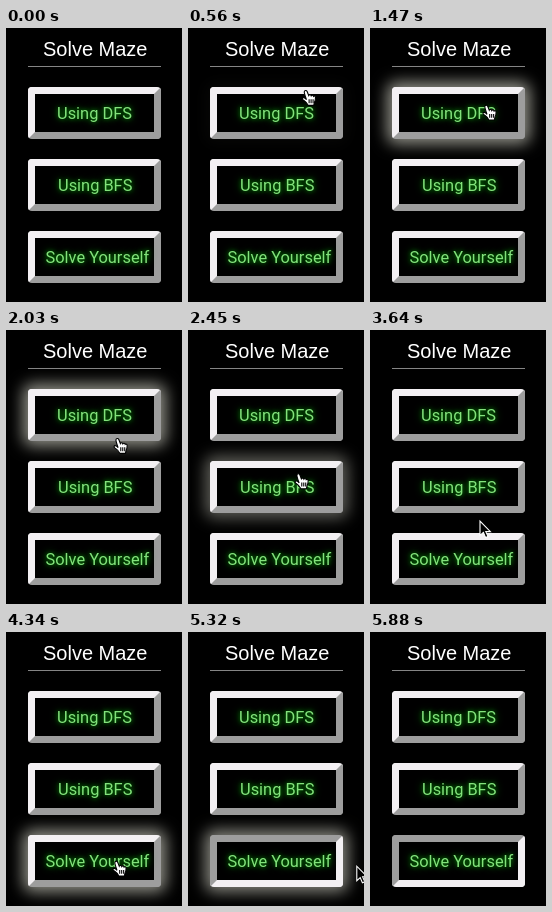
These frames come from a looping animation (176x274 px, 5950 ms). An HTML page:

```html
<!DOCTYPE html>
<html lang="en">
<head>
<meta charset="utf-8">
<title>Solve Maze</title>
<style>
  html, body { margin: 0; width: 100%; height: 100%; overflow: hidden; background: #000; }
  #stage { position: relative; width: 176px; height: 274px; overflow: hidden; background: #000; }
  h1 {
    position: absolute; left: 37px; top: 9px; margin: 0; white-space: nowrap;
    font: 20px/24px "Liberation Sans", Arial, sans-serif; color: #fff;
  }
  .rule { position: absolute; left: 22px; top: 38px; width: 133px; height: 1px; background: #858585; }
  .btn {
    --lit: #f3f0f3; --dim: #9d9d9d;
    position: absolute; left: 22px; width: 133px; height: 52px; box-sizing: border-box;
    border: 7px solid; border-color: var(--lit) var(--dim) var(--dim) var(--lit);
    border-radius: 4px; background: #000;
  }
  .btn.pressed { border-color: var(--dim) var(--lit) var(--lit) var(--dim); }
  .btn span {
    position: absolute; top: 10px; white-space: nowrap;
    font: 16.4px/20px Roboto, Inter, sans-serif; color: #82e27b;
    text-shadow: 0 0 4px #0a8a0a, 0 0 8px #0a7a0a;
  }
  svg { position: absolute; left: 0; top: 0; }
</style>
</head>
<body>
<div id="stage">
  <h1>Solve Maze</h1>
  <div class="rule"></div>
  <div class="btn"><span style="left:22px">Using DFS</span></div>
  <div class="btn"><span style="left:23px">Using BFS</span></div>
  <div class="btn"><span style="left:10.5px">Solve Yourself</span></div>
  <svg width="176" height="274">
    <g id="cursor">
      <path id="arrow" d="M0 0V14.5L3.4 11.4 5.6 16.6 8 15.6 5.8 10.6H10.4Z"
        fill="#000" stroke="#fff" stroke-width="1.1"/>
      <g id="hand" transform="translate(-4 -2) scale(1.1)" stroke="#000">
        <path fill="#fff" d="M4.6 9.4C3.8 7.2 2.4 3.6 2.6 2.2 2.8.8 4.6.6 5.2 2L6.6 5.6C7 4.6 8.6 4.8 8.9 5.9 9.4 5 10.8 5.2 11 6.4 11.6 5.8 12.8 6.2 12.8 7.4 12.8 9.4 12.6 10.4 11.8 12L11.2 14.6H6.2C5.4 13 3.2 10.6 1.6 9.6.4 8.8.8 7.4 2.2 7.6 3.2 7.8 4 8.6 4.6 9.4Z"/>
        <path fill="none" d="M7 9V12.6M8.8 9V12.6M10.6 9V12.6"/>
      </g>
    </g>
  </svg>
</div>
<script>
const LOOP = 5950, STEP = 70, PRESS = 4550, FADE = 300;
const LEFT = 22, TOP = 59, WIDTH = 133, HEIGHT = 52, PITCH = 72;

// the pointer's moves: start time, end time, where it comes to rest
const origin = [156, 20];
const moves = [
  [70, 800, 116, 78],
  [1470, 2760, 110, 156],
  [3100, 3450, 110, 191],
  [3640, 4060, 110, 230],
  [5200, 5500, 185, 242]
];

const $ = id => document.getElementById(id);
const cursor = $("cursor"), arrow = $("arrow"), hand = $("hand");
const buttons = [...document.querySelectorAll(".btn")];
buttons.forEach((btn, i) => btn.style.top = TOP + i * PITCH + "px");

const smooth = p => p * p * (3 - 2 * p);
const easeOut = p => 1 - (1 - p) ** 3;

function pointAt(t) {
  let [x, y] = origin;
  for (const [from, to, toX, toY] of moves) {
    const p = Math.min(1, Math.max(0, (t - from) / (to - from)));
    x += (toX - x) * easeOut(p);
    y += (toY - y) * smooth(p);
  }
  return [x, y];
}

// index of the button under the pointer, or -1
function hovered(t) {
  const [x, y] = pointAt(t);
  const row = Math.floor((y - TOP) / PITCH);
  const inside = x >= LEFT && x < LEFT + WIDTH && y - TOP - row * PITCH < HEIGHT;
  return inside ? row : -1;
}

// the glow follows how much of the last FADE ms was spent on the button
function glowAt(t, i) {
  const samples = 30;
  let hits = 0;
  for (let k = 0; k < samples; k++) hits += hovered(t - k * FADE / samples) === i;
  return smooth(hits / samples);
}

function draw(time) {
  const t = Math.floor((time % LOOP) / STEP) * STEP;
  const [x, y] = pointAt(t);
  const over = hovered(t) >= 0;

  cursor.style.display = t < moves[0][0] ? "none" : "";
  cursor.setAttribute("transform", `translate(${x} ${y})`);
  hand.style.display = over ? "" : "none";
  arrow.style.display = over ? "none" : "";

  buttons.forEach((btn, i) => {
    btn.style.boxShadow = `0 0 15px 5px rgba(145,145,136,${glowAt(t, i)})`;
  });
  buttons[2].classList.toggle("pressed", t >= PRESS);
}

const start = performance.now();
function tick() {
  draw(performance.now() - start);
  requestAnimationFrame(tick);
}
tick();
</script>
</body>
</html>
```
